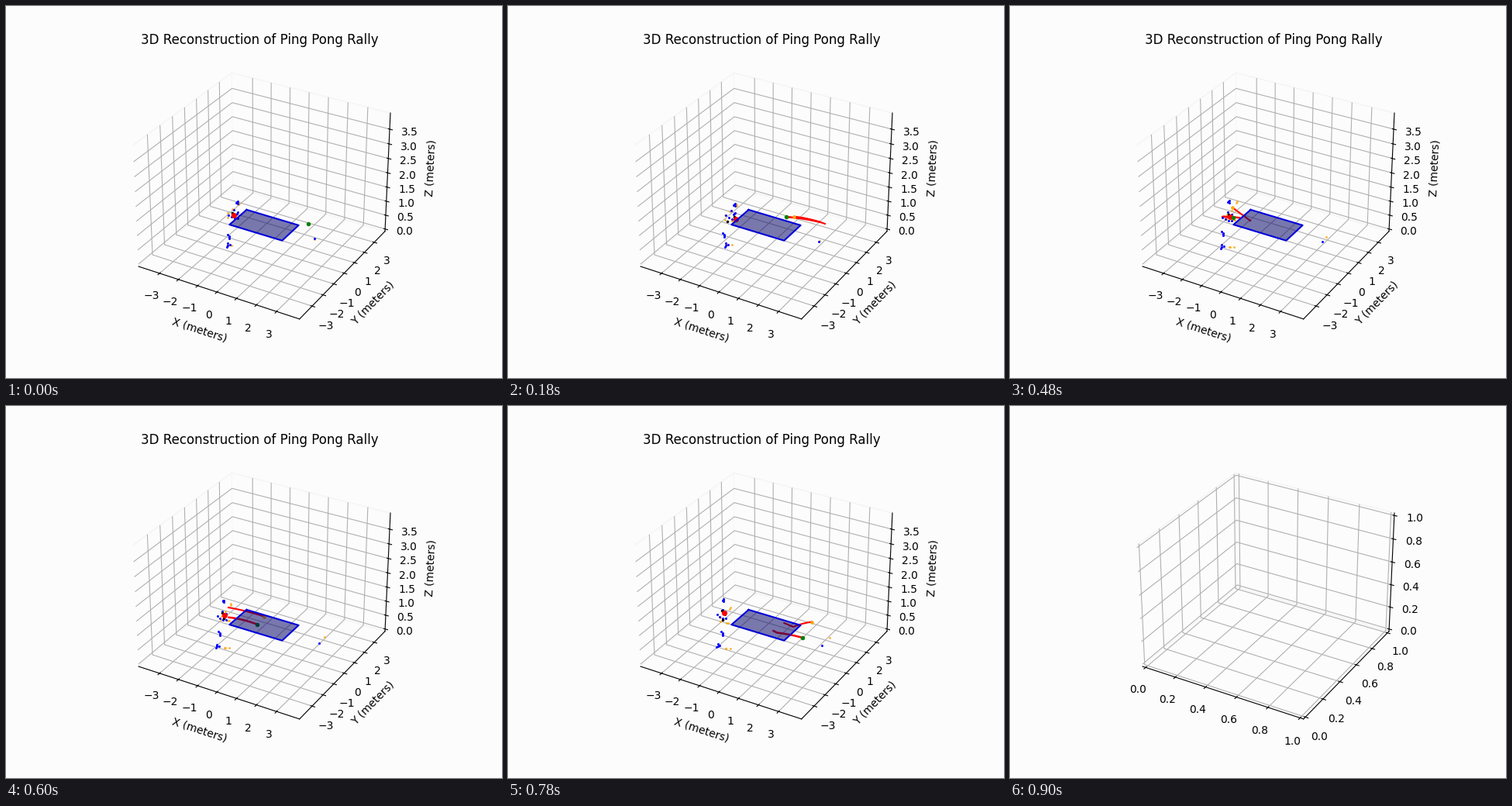
Write a matplotlib script that moves like this. It is 640 by 480 pixels and loops after 930 ms.

```python
import numpy as np
import matplotlib.pyplot as plt
from matplotlib.animation import FuncAnimation

W, H, DPI = 640, 480, 100
FRAMES, STEP_MS = 31, 30
TRAIL = 4
BG = "#fcfcfc"
LIM, PAD = 3.96, 1 / 48

# Each body part is a loose cluster: dot count, spread, centre at each key time.
KEYS = [0, 8, 16, 29]
PLAYER = [
    (4, (2, 3), [(297, 255), (289, 259), (281, 254), (275, 251)]),
    (8, (7, 7), [(292, 268), (284, 269), (279, 271), (273, 267)]),
    (4, (6, 3), [(288, 297), (276, 294), (275, 293), (277, 293)]),
    (4, (3, 3), [(286, 308), (280, 308), (273, 310), (270, 308)]),
    (1, (0, 0), [(398, 300), (402, 305), (403, 304), (406, 311)]),
]
GHOST = [
    (2, (1, 2), [(300, 255), (293, 257), (292, 253), (284, 263)]),
    (5, (6, 7), [(292, 268), (284, 272), (286, 270), (278, 275)]),
    (3, (4, 2), [(287, 308), (284, 307), (285, 310), (282, 313)]),
    (1, (0, 0), [(398, 301), (403, 303), (408, 298), (417, 299)]),
]
PADDLE = [(294, 270), (294, 277), (284, 272), (277, 265)]
GHOST_PADDLE = [(292, 270), (280, 280), (284, 273), (275, 277)]

# Hits and bounces: time, x, y and the lift of the arc that follows.
BALL = [(0, 390, 281, 0), (1.5, 407, 280, 5.5), (11, 305, 275, 1),
        (14.5, 274, 272, 5), (22.5, 347, 292.5, 2.3), (29, 409, 309, 0)]
GHOST_BALL = [(0, 390, 281, 0), (2, 409, 281, 8), (12, 310, 277, 0),
              (16, 287, 260, 2.7), (23, 368, 285, 3.4), (29, 416, 279, 0)]

TABLE = [(310.5, 262.9), (377.6, 282.9), (356.3, 302.7), (288.4, 282.1)]


def centre(points, t):
    return np.array([np.interp(t, KEYS, c) for c in zip(*points)])


def scatter_body(parts, seed):
    """Fixed offset of every dot from the centre of its part."""
    rng = np.random.default_rng(seed)
    return [rng.uniform(-1, 1, (n, 2)) * spread for n, spread, _ in parts]


def pose(parts, offsets, t):
    return np.vstack([centre(points, t) + off
                      for (_, _, points), off in zip(parts, offsets)])


def fly(path, t):
    """Positions along parabolic arcs between hits."""
    knots = np.array(path)
    k = np.clip(np.searchsorted(knots[:, 0], t, "right") - 1, 0, len(path) - 2)
    a, b = knots[k], knots[k + 1]
    u = (t - a[:, 0]) / (b[:, 0] - a[:, 0])
    points = a[:, 1:3] + u[:, None] * (b - a)[:, 1:3]
    points[:, 1] -= a[:, 3] * 4 * u * (1 - u)
    return points


def padded(low, high):
    pad = (high - low) * PAD
    return low - pad, high + pad


def make_box(xy_lim, z_lim):
    ax = fig.add_subplot(111, projection="3d")
    ax.set_facecolor(BG)
    ax.set_xlim(*xy_lim, view_margin=0)
    ax.set_ylim(*xy_lim, view_margin=0)
    ax.set_zlim(*z_lim, view_margin=0)
    for axis in (ax.xaxis, ax.yaxis, ax.zaxis):
        axis.set_pane_color((0.988, 0.988, 0.988, 1))
        axis.pane.set_edgecolor("#f4f4f4")
    return ax


fig = plt.figure(figsize=(W / DPI, H / DPI), dpi=DPI, facecolor=BG)

court = make_box(padded(-LIM, LIM), padded(0, LIM))
court.set_xticks(range(-3, 4))
court.set_yticks(range(-3, 4))
court.set_zticks(np.arange(0, 3.6, 0.5))
court.set_xlabel("X (meters)")
court.set_ylabel("Y (meters)")
court.set_zlabel("Z (meters)")
court.set_title("3D Reconstruction of Ping Pong Rally", x=0.4985)

blank = make_box(padded(0, 1), padded(0, 1))

# Flat layer in pixel coordinates for the players, the balls and the table.
play = fig.add_axes([0, 0, 1, 1])
play.set_xlim(0, W)
play.set_ylim(H, 0)
play.axis("off")


def dots(color, px, z, alpha=1):
    return play.scatter([], [], s=(px * 72 / DPI) ** 2, color=color,
                        linewidths=0, zorder=z, alpha=alpha)


ghost_trail, = play.plot([], [], color="red", lw=1.5, zorder=2)
trail, = play.plot([], [], color="red", lw=1.8, zorder=2)
ghost = dots("orange", 2.8, 3, 0.85)
ghost_ball = dots("orange", 4.5, 3)
body = dots("blue", 3, 4)
paddle_back = dots("black", 3.5, 5)
paddle = dots("red", 7, 6)
ball = dots("green", 5.5, 7)
play.fill(*zip(*TABLE), facecolor="#000066", alpha=0.52, lw=0, zorder=8)
play.plot(*zip(*TABLE, TABLE[0]), color="#0000dc", lw=1.5, zorder=9)

body_offsets = scatter_body(PLAYER, 4)
ghost_offsets = scatter_body(GHOST, 9)


def update(i):
    live = i < FRAMES - 1
    court.set_visible(live)
    play.set_visible(live)
    blank.set_visible(not live)
    if not live:
        return

    body.set_offsets(pose(PLAYER, body_offsets, i))
    ghost.set_offsets(pose(GHOST, ghost_offsets, i))
    grip = centre(PADDLE, i)
    paddle.set_offsets([grip])
    paddle_back.set_offsets([grip - (2.5, 3), centre(GHOST_PADDLE, i)])

    times = np.linspace(max(0, i - TRAIL), i, 25)
    for path, dot, line in ((BALL, ball, trail),
                            (GHOST_BALL, ghost_ball, ghost_trail)):
        points = fly(path, times)
        line.set_data(points[:, 0], points[:, 1])
        dot.set_offsets(points[-1:])


anim = FuncAnimation(fig, update, frames=FRAMES, interval=STEP_MS,
                     init_func=lambda: update(0), repeat=True, repeat_delay=0)
plt.show()
```
